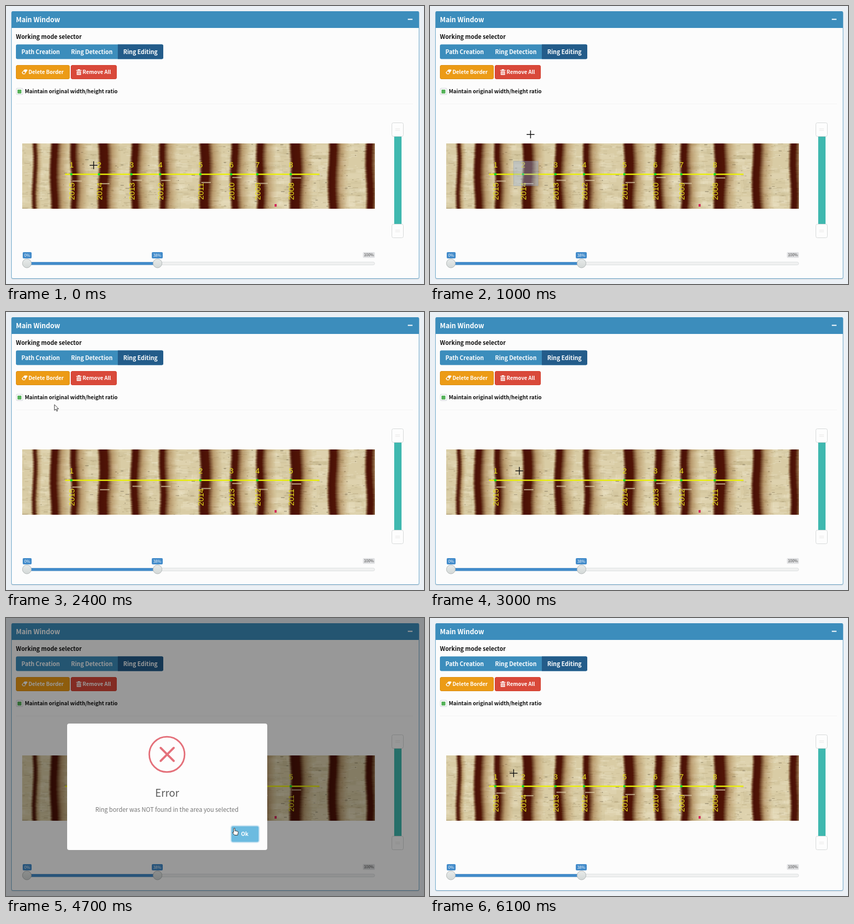
Animation of 800 by 532 pixels, one loop 6.2 s. Source, as an HTML page with a canvas:

```html
<!DOCTYPE html>
<html lang="en">
<head>
<meta charset="utf-8">
<title>Ring editing</title>
<style>
  html, body { margin: 0; width: 100%; height: 100%; overflow: hidden; background: #ebf0f5; }
  .panel { position: absolute; left: 10px; top: 10px; width: 779px; height: 510px;
    background: #fcfcfc; border: 1px solid #6fa9cc; border-radius: 3px; box-shadow: 0 1px 1px #0002; }
  .bar { position: absolute; left: 11px; top: 10px; width: 779px; height: 32px;
    background: #3c8dbc; border-radius: 2px 2px 0 0; }
  canvas { position: absolute; left: 31px; top: 263px; }
  svg { position: absolute; left: 0; top: 0; }
  text { font-family: 'Noto Sans CJK SC', 'Noto Sans CJK JP', 'Noto Sans CJK', 'Noto Sans', sans-serif; font-weight: 700; }
  .ring text { font: 15px 'Liberation Sans', Arial, sans-serif; fill: #e9e01c; text-anchor: middle; }
  .tip { font-size: 7.4px; font-weight: 400; text-anchor: middle; }
  .mid { text-anchor: middle; }
</style>
</head>
<body>
<div class="panel"></div>
<div class="bar"></div>
<canvas id="wood" width="675" height="125"></canvas>
<svg width="800" height="532" viewBox="0 0 800 532">
  <defs>
    <linearGradient id="knob" x2="0" y2="1">
      <stop stop-color="#e8ebea"/><stop offset="1" stop-color="#d3d8d7"/>
    </linearGradient>
  </defs>

  <text x="19" y="31" font-size="12.8" fill="#fff">Main Window</text>
  <path d="M769 25.5h9" stroke="#fff" stroke-width="2"/>
  <text x="19" y="63" font-size="11.1" fill="#111">Working mode selector</text>

  <rect x="19" y="73.5" width="282" height="28" rx="3" fill="#3c8dbc"/>
  <path d="M214 73.5h84a3 3 0 0 1 3 3v22a3 3 0 0 1-3 3h-84z" fill="#235c8a"/>
  <g font-size="11" fill="#fff">
    <text x="29.5" y="91.5">Path Creation</text>
    <text x="124.5" y="91.5">Ring Detection</text>
    <text x="224.5" y="91.5">Ring Editing</text>
  </g>

  <rect id="del" x="19.5" y="113.5" width="102" height="26" rx="2.5" stroke="#db8c10"/>
  <rect x="124.5" y="113.5" width="87" height="26" rx="2.5" fill="#d9493a" stroke="#d3402f"/>
  <path d="M30 127.500L35.300 121.500h4.400q1.700.3 1.200 1.800L36 130.500h-3.500z" fill="#fff"/>
  <path d="M31.800 127.300l2.200-2.500 3 2.700-1.700 1.800h-2z" fill="#e2951a"/>
  <path d="M134.500 122.500h10v1.500h-10zM137.500 121h4v1.500h-4zM135.500 125h8v7h-8z" fill="#fff"/>
  <path d="M137.500 126v5M139.500 126v5M141.500 126v5" stroke="#d9493a" stroke-width=".8"/>
  <g font-size="9.95" fill="#fff">
    <text x="43" y="130.3">Delete Border</text>
    <text x="146.5" y="130.3">Remove All</text>
  </g>

  <rect x="20" y="157.5" width="12" height="12" rx="1" fill="#fff" stroke="#cdd2d6"/>
  <rect x="22" y="160" width="7.5" height="7.5" rx="1" fill="#55b259"/>
  <text x="36" y="166.8" font-size="10.1" fill="#111">Maintain original width/height ratio</text>
  <path d="M19 187.5h760" stroke="#f4f4f4"/>

  <rect x="743" y="240" width="14" height="190" fill="#3fb8af"/>
  <g id="grips"></g>

  <rect x="36.5" y="490" width="669" height="5.5" rx="2.7" fill="#f0f1f1" stroke="#dcdfe0"/>
  <rect x="40" y="490" width="250" height="5.5" fill="#428bca"/>
  <g fill="url(#knob)" stroke="#b3b8b8">
    <circle cx="40" cy="492.5" r="8.5"/><circle cx="290" cy="492.5" r="8.5"/>
  </g>
  <g fill="#428bca">
    <rect x="32" y="471" width="17" height="12" rx="2"/><rect x="279" y="471" width="21" height="12" rx="2"/>
  </g>
  <rect x="683" y="471" width="23" height="11" rx="2" fill="#e1e2e4"/>
  <text class="tip" x="40.5" y="480" fill="#fff">0%</text>
  <text class="tip" x="289.5" y="480" fill="#fff">38%</text>
  <text class="tip" x="694.5" y="479" fill="#444">100%</text>

  <path d="M113 322h487" stroke="#e8ee08" stroke-width="2.6"/>
  <g id="rings"></g>
  <rect id="sel" fill="#99b4e0" fill-opacity=".38" stroke="#7d8ca8" stroke-opacity=".4"/>

  <rect id="shade" width="800" height="532"/>
  <g id="modal">
    <rect x="117" y="202" width="383" height="242" rx="4" fill="#fdfdfd"/>
    <g id="badge" fill="none" stroke="#e4707a">
      <circle cx="308" cy="261" r="33.8" stroke-width="3"/>
      <path id="cross" d="M296 248.5l25 25M321 248.5l-25 25" stroke-width="4" stroke-linecap="round"/>
    </g>
    <text class="mid" x="308.5" y="342" font-size="19.5" style="font-weight:500" fill="#595959">Error</text>
    <text class="mid" x="308" y="370.5" font-size="11.45" style="font-weight:400" fill="#757575">Ring border was NOT found in the area you selected</text>
    <rect x="430.5" y="397.5" width="54" height="32" rx="4" fill="#6cbbe0" stroke="#cfe6f3" stroke-width="2"/>
    <text class="mid" x="457" y="417.3" font-size="10.4" fill="#fff">Ok</text>
  </g>

  <g id="cursor" stroke="#222" stroke-width=".9" fill="#fff" stroke-linejoin="round">
    <path id="plus" d="M-7.5 0h15M0-7.5v15" stroke="#111" stroke-width="1.5"/>
    <path id="arrow" d="M0 0v11l2.6-2.3 1.8 4 1.8-.8-1.8-3.800h3.600z"/>
    <path id="hand" d="M-1.200.8q1.200-1.600 2.400 0v4.400l5 1q1.400.4 1.200 2l-1 5.300h-6l-3.800-4.600q-.4-1.800 2.200-.6z"/>
  </g>
</svg>
<script>
const LOOP = 6200, STEP = 100;
const $ = id => document.getElementById(id);
const set = (el, attrs) => { for (const k in attrs) el.setAttribute(k, attrs[k]); };
const show = (el, on) => { el.style.display = on ? '' : 'none'; };
const clamp = v => Math.min(1, Math.max(0, v));
const mix = (a, b, p) => a + (b - a) * p;
const ease = p => p * p * (3 - 2 * p);
const ramp = (t, from, to) => ease(clamp((t - from) / (to - from)));

let seed = 7;
const rnd = () => (seed = seed * 16807 % 2147483647) / 2147483647;

// Left edges of the dark bands; eight of them carry a ring mark.
const EDGES = [52, 86, 125, 178, 240, 295, 372, 431, 481, 545, 618, 690];
const MARKS = EDGES.slice(2, 10);
const bandWidth = i => (i ? 14 + 4 * Math.sin(i * 2.1 + 1.2) + (i > 7 ? 2 : 0) : 6);

function drawWood() {
  const c = $('wood').getContext('2d');
  const rect = (x, y, w, h, color) => { c.fillStyle = color; c.fillRect(x, y, w, h); };
  const flecks = (n, color, len, thick) => {
    while (n--) rect(rnd() * 700 - 20, rnd() * 125, len * (.2 + rnd()), thick * (.5 + rnd()), color);
  };
  rect(0, 0, 675, 125, '#d9cca5');
  flecks(220, 'rgba(236,227,198,.25)', 34, 9);
  flecks(160, 'rgba(186,172,132,.16)', 30, 7);
  flecks(500, 'rgba(236,228,202,.35)', 12, 1.5);
  flecks(450, 'rgba(140,122,82,.22)', 10, 1.3);
  flecks(170, 'rgba(80,70,50,.4)', 6, 1.3);

  const bands = EDGES.map((x, i) => {
    const w = bandWidth(i), span = w + (i ? 24 : 10);
    const fill = c.createLinearGradient(-4, 0, span, 0);
    const stop = (at, color) => fill.addColorStop((at + 4) / (span + 4), color);
    stop(-4, 'rgba(150,105,60,0)');
    stop(.5, 'rgba(88,34,14,.85)');
    stop(3, '#4a1006');
    stop(w - 3, '#501406');
    stop(w, 'rgba(92,42,16,.85)');
    stop(mix(w, span, .3), 'rgba(150,102,52,.5)');
    stop(span, 'rgba(185,145,85,0)');
    return { x, span, fill };
  });
  for (let y = 0; y < 125; y++) {
    bands.forEach(({ x, span, fill }, i) => {
      c.setTransform(1, 0, 0, 1, x - 31 + Math.sin(y / 21 + i * 2) * 1.4 + rnd() - .5, 0);
      rect(-4, y, span + 4, 1, fill);
    });
  }
  c.setTransform(1, 0, 0, 1, -31, -263);
  MARKS.forEach(x => rect(x + 2, 326 + rnd() * 15, 18, 2.2, 'rgba(224,208,172,.7)'));
  rect(514, 379, 4, 5, '#d22a5c');
}

function makeRings(marks) {
  return '<g class="ring">' + marks.map((x, i) =>
    `<circle cx="${x}" cy="322" r="2.3" fill="#10e020"/>` +
    `<text x="${x + .5}" y="309">${i + 1}</text>` +
    `<text transform="translate(${x + 6} 354.5) rotate(-90)">${2015 - i}</text>`).join('') + '</g>';
}

// Each gesture brushes an area, then visits the delete button.
const GESTURES = [
  { start: -100, end: 290, hit: 1108, x: 160, y: 297, w: 47, h: 47, aim: 62 },
  { start: 1500, end: 1700, hit: 1900, x: 217, y: 298, w: 96, h: 50, aim: 58 },
  { start: 3000, end: 3400, hit: 3750, x: 171, y: 304, w: 88, h: 42, aim: 80 }
];
const TRIP = 200, CLICK = 100, OPEN = 3850, CLOSE = 5650, RESET = 6000;
const cleared = g => (g === GESTURES[2] ? RESET : g.hit + CLICK);

// The three ring sets: all, then without the marks brushed so far.
const brushed = (g, x) => x > g.x && x < g.x + g.w;
const ringSets = [0, 1, 2].map(n => MARKS.filter(x => !GESTURES.slice(0, n).some(g => brushed(g, x))));
$('rings').innerHTML = ringSets.map(makeRings).join('');
$('grips').innerHTML = [223.5, 417.5].map(y =>
  `<rect x="738.5" y="${y}" width="22" height="26" rx="3" fill="#fdfdfd" stroke="#d6d9d9"/>` +
  `<path d="M745 ${y + 11.5}h9M745 ${y + 14.5}h9" stroke="#e8e7e6"/>`).join('');

// Pointer stops; a bend above 1 makes x lag behind y on the way there.
const stops = [];
const stop = (t, x, y, bend = 1) => stops.push({ t, x, y, bend });
GESTURES.forEach(({ start, end, hit, x, y, w, h, aim }) => {
  stop(start, x, y);
  stop(end, x + w, y + h);
  stop(hit - TRIP, x + w, y + h);
  stop(hit, aim, 121, 2.8);
  stop(hit + CLICK + 50, aim, 121);
});
stop(4200, 80, 121);
stop(4600, 437, 402);
stop(5650, 437, 402);
stop(LOOP + GESTURES[0].start, GESTURES[0].x, GESTURES[0].y);

function pointer(t) {
  const i = stops.findIndex(s => s.t > t);
  if (i < 0) return stops[stops.length - 1];
  const a = stops[i - 1], b = stops[i], p = ramp(t, a.t, b.t);
  return { x: mix(a.x, b.x, p ** b.bend), y: mix(a.y, b.y, p) };
}

function drawSelection(t) {
  const g = GESTURES.find(g => t > Math.max(0, g.start) && t < cleared(g));
  show($('sel'), g);
  if (!g) return;
  const p = ramp(t, g.start, g.end);
  set($('sel'), { x: g.x, y: g.y, width: g.w * p, height: g.h * p });
}

const about = (x, y, sx, sy) => `translate(${x} ${y}) scale(${sx} ${sy}) translate(${-x} ${-y})`;

function drawModal(t) {
  const age = t - OPEN, out = 1 - clamp((t - CLOSE) / 300);
  const on = age > 0 && out > 0;
  show($('shade'), on);
  show($('modal'), on);
  if (!on) return false;
  const size = 1 - .5 * Math.exp(-age / 45) * Math.cos(age / 50);
  const turn = clamp(age / 500), pop = clamp((age - 250) / 250);
  const mark = .4 + .6 * pop + .35 * pop * Math.sin(Math.PI * pop);
  set($('shade'), { opacity: .4 * ramp(age, 0, 280) * out });
  set($('modal'), { opacity: ramp(age, 0, 400) * out, transform: about(308.5, 323, size, size) });
  set($('badge'), { opacity: turn, transform: about(308, 261, 1, Math.cos((1 - turn) * 1.7)) });
  set($('cross'), { opacity: pop, transform: about(308.5, 261, mark, mark) });
  return true;
}

function draw(t) {
  const done = t >= RESET ? 0 : GESTURES.filter(g => t >= cleared(g)).length;
  [...$('rings').children].forEach((g, i) => show(g, i === done));
  drawSelection(t);
  const modal = drawModal(t);

  const { x, y } = pointer(t);
  const inside = (l, top, r, b) => x > l && x < r && y > top && y < b;
  const overDel = !modal && inside(19, 113, 122, 140);
  const overOk = modal && inside(430, 397, 485, 430);
  const overPlot = !modal && inside(31, 200, 706, 450);
  const kind = overDel || overOk ? 'hand' : overPlot ? 'plus' : 'arrow';
  ['plus', 'arrow', 'hand'].forEach(k => show($(k), k === kind));
  set($('cursor'), { transform: `translate(${x} ${y})` });
  set($('del'), { fill: overDel ? '#dc8e10' : '#ec9b16' });
}

drawWood();
const start = performance.now();
function tick() {
  const t = (performance.now() - start) % LOOP;
  draw(Math.floor(t / STEP) * STEP);
  requestAnimationFrame(tick);
}
tick();
</script>
</body>
</html>
```
